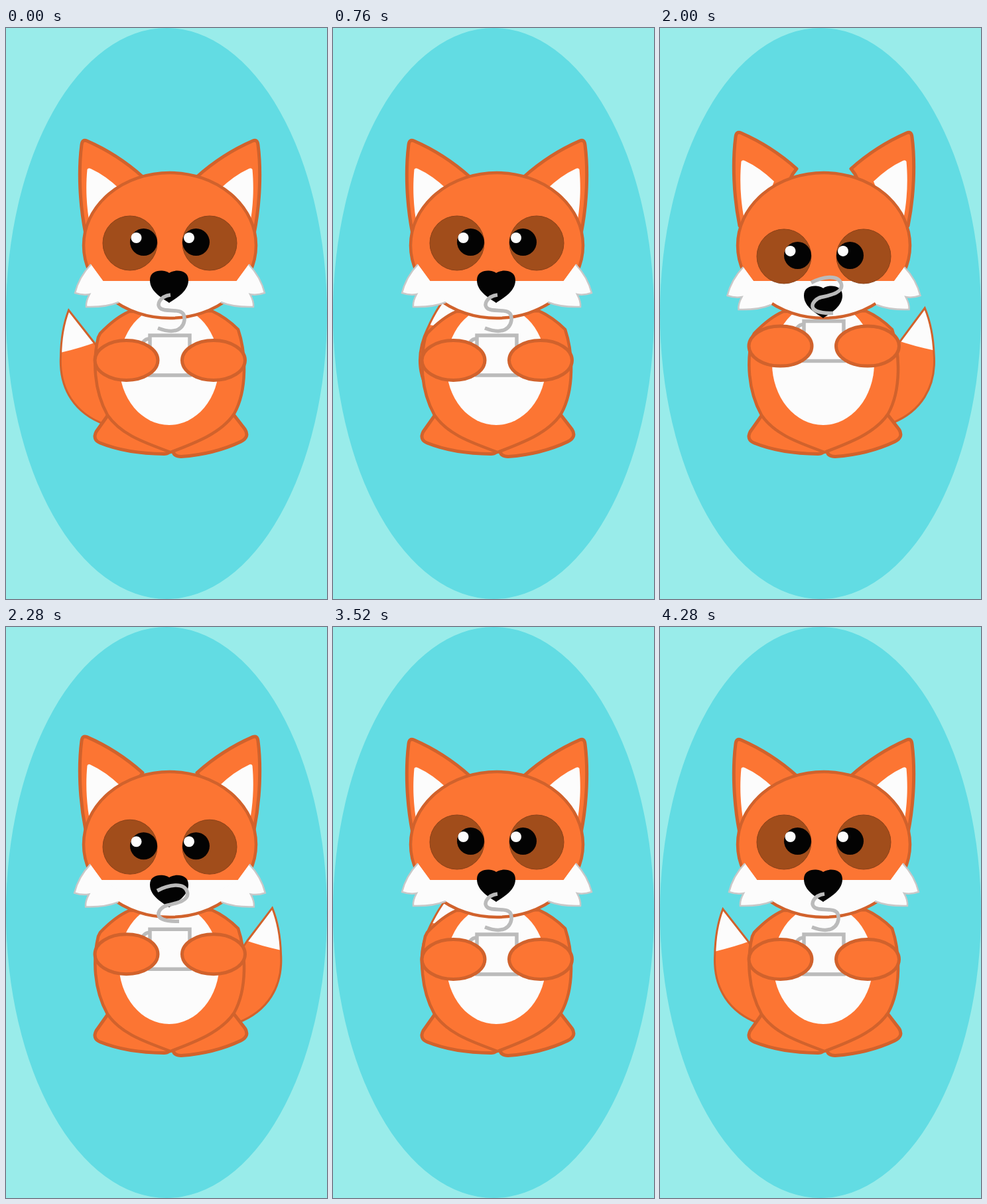
An HTML page for the animation above (4320 ms loop, 484 by 860 pixels).

```html
<!DOCTYPE html>
<html lang="en">
<head>
<meta charset="utf-8">
<title>Fox with a mug</title>
<style>
  html, body { margin: 0; width: 100%; height: 100%; overflow: hidden; background: #99ecea; }
  svg { display: block; width: 100vw; height: 100vh; }
  .fur { fill: #fc7533; stroke: #d1622c; stroke-width: 5; stroke-linejoin: round; }
  .white { fill: #fcfcfc; }
  .line { fill: none; stroke: #bbb; stroke-width: 5.5; }
</style>
</head>
<body>
<svg viewBox="0 0 484 860">
  <defs>
    <clipPath id="chin"><path d="M100 381H400V450H100Z"/></clipPath>
    <path id="tailShape" d="M404.5 425Q416 455 416.5 495C419 545 394 581 350 597L305 600L300 555Q335 520 366 474Z"/>
    <clipPath id="tailClip"><use href="#tailShape"/></clipPath>
    <ellipse id="skull" cx="247" cy="327.5" rx="130" ry="109.5"/>
    <g id="ear">
      <path class="fur" d="M120 310C111 265 109 215 114 176Q115 167 122 170Q168 190 206 224L200 232L160 310Z"/>
      <path class="white" d="M127 300C121 270 120 240 122.5 213Q124 210 128 212Q150 222 172 243L150 300Z"/>
    </g>
    <g id="cheek">
      <path class="white" d="M128 356L104 399Q116 403 126 401Q120 412 121 420Q150 421 170 413L180 398L146 381Z"/>
      <path d="M128 356Q110 375 104 399Q116 403 126 401Q120 412 121 420Q150 421 170 413" fill="#fcfcfc" stroke="#c8c8c8" stroke-width="2.5"/>
    </g>
    <g id="eye">
      <circle cx="187" cy="324" r="41" fill="#a14d1b" stroke="#8c4219"/>
      <circle cx="207.5" cy="322.5" r="20.5" fill="#030303"/>
    </g>
  </defs>

  <ellipse cx="242" cy="430" rx="242" ry="430" fill="#62dce3"/>

  <g id="tail">
    <use href="#tailShape" fill="#fc7533"/>
    <path class="white" clip-path="url(#tailClip)" d="M350 410H430V492Q392 484 360 472Z"/>
    <use href="#tailShape" fill="none" stroke="#d1622c" stroke-width="3"/>
  </g>

  <path class="fur" d="M153 584L136 608Q130 620 142 625Q182 641 238 641.5Q248 641 248 634L200 590Z"/>
  <path class="fur" d="M343 582L360 604Q368 616 354 623Q314 642 264 645.5Q252 645 252 637L300 590Z"/>
  <path class="fur" style="stroke-width:4.5" d="M186 427Q165 436 142 460L139 466C131 500 132 545 153 583C175 615 215 626 248 639C285 625 325 610 344 581C364 545 362 490 350 454Q332 436 310 426Z"/>
  <ellipse id="belly" class="white" cx="246"/>

  <g id="ears">
    <use href="#ear"/>
    <use href="#ear" transform="matrix(-1 0 0 1 494 0)"/>
  </g>
  <use href="#skull" fill="#fc7533"/>
  <g clip-path="url(#chin)"><use href="#skull" class="white"/></g>
  <use href="#skull" fill="none" stroke="#d1622c" stroke-width="4.5"/>
  <use id="cheekL" href="#cheek"/>
  <use id="cheekR" href="#cheek"/>
  <g id="eyes">
    <use href="#eye"/>
    <use href="#eye" transform="matrix(-1 0 0 1 494 0)"/>
    <circle class="white" cx="196.5" cy="316" r="8"/>
    <circle class="white" cx="276" cy="316" r="8"/>
  </g>
  <path id="nose" fill="#030303" d="M246 369C240 364 217 362 217 380C217 398 238 408 246 414C254 408 275 398 275 380C275 362 252 364 246 369Z"/>

  <g id="sip">
    <ellipse class="line" cx="216" cy="485" rx="13" ry="17"/>
    <path class="line" style="fill:#fcfcfc" d="M217 463H277V523H217Z"/>
    <path id="steam" class="line"/>
    <ellipse class="fur" cx="181.5" cy="500.5" rx="47.5" ry="30"/>
    <ellipse class="fur" cx="313" cy="500.5" rx="47.5" ry="30"/>
  </g>
</svg>
<script>
const LOOP = 4320, QUARTER = LOOP / 4;
const STEAM_A = [248,402, 232,404, 225,418, 234,423, 264,422, 268,432, 266,466, 229,452];
const STEAM_B = [228,405, 245,396, 268,392, 273,406, 256,424, 243,427, 215,452, 261,451];

const el = id => document.getElementById(id);
const set = (id, name, value) => el(id).setAttribute(name, value);
const move = (id, y) => set(id, 'transform', `translate(0 ${y})`);
const ramp = (t, from, to) => Math.min(1, Math.max(0, (t - from) / (to - from)));
// Rises from 0 to 1 over a..b, holds, and falls back over c..d.
const pulse = (t, a, b, c, d) => ramp(t, a, b) - ramp(t, c, d);

function draw(t) {
  // The tail eases in behind the body, then eases out mirrored on the other side.
  const fold = (1 - Math.cos(t / QUARTER * Math.PI)) / 2;
  const onLeft = t < QUARTER || t >= 3 * QUARTER;
  const flip = onLeft ? 'matrix(-1 0 0 1 499 0) ' : '';
  set('tail', 'transform', `${flip}rotate(${-29 * fold} 283 620)`);

  const up = pulse(t, 1160, 1600, 2000, 2440);
  move('ears', -12 * up);
  move('eyes', 20 * up);
  move('nose', 23 * up);
  move('sip', -21.5 * up);
  set('cheekL', 'transform', `translate(${-2.5 * up} ${4 * up})`);
  set('cheekR', 'transform', `matrix(-1 0 0 1 ${494 + 2.5 * up} ${4 * up})`);
  set('belly', 'cy', 508 - 3 * up);
  set('belly', 'rx', 75 + 2 * up);
  set('belly', 'ry', 90 + 3 * up);

  const curl = pulse(t, 1600, 2000, 2800, 3180);
  const p = STEAM_A.map((a, i) => a + (STEAM_B[i] - a) * curl);
  set('steam', 'd', `M${p.slice(0, 2)}C${p.slice(2, 8)}S${p.slice(8)}`);
}

const start = performance.now();
function tick() {
  draw((performance.now() - start) % LOOP);
  requestAnimationFrame(tick);
}
tick();
</script>
</body>
</html>
```
